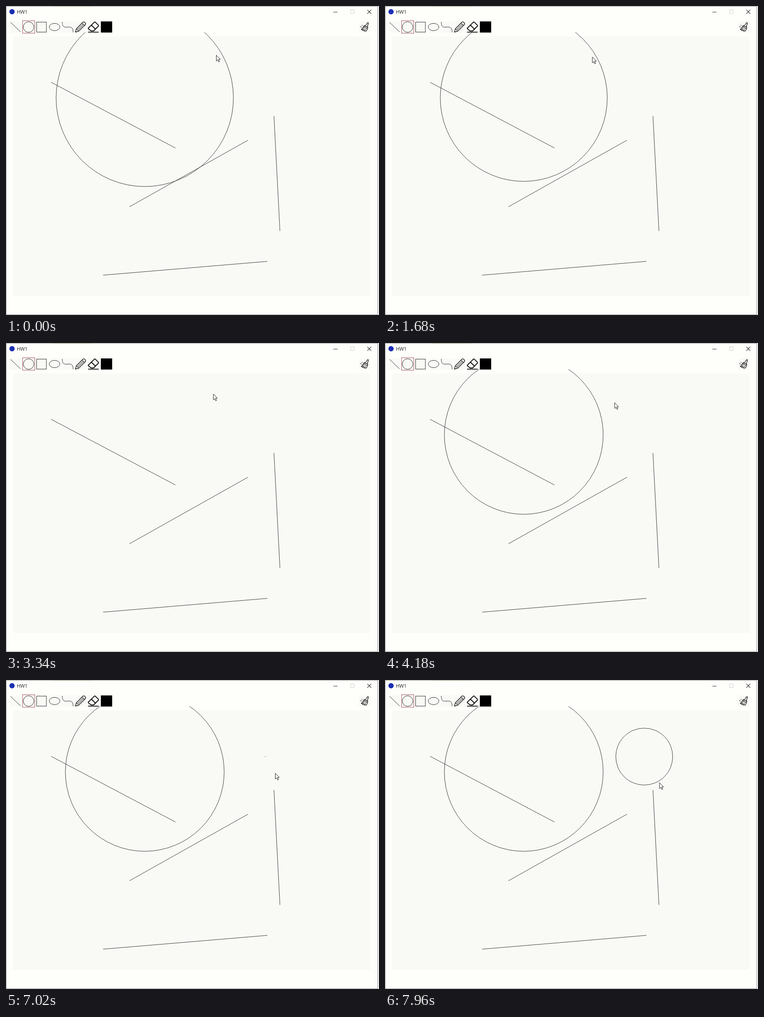
Recreate the animation shown at these times as an HTML page. Size 822 by 681 pixels, loop 8000 ms.

```html
<!DOCTYPE html>
<html lang="en">
<head>
<meta charset="utf-8">
<title>Drawing window</title>
<style>
  html, body { margin: 0; width: 100%; height: 100%; overflow: hidden; background: #fefefb; }
  svg { display: block; width: 100%; height: 100%; }
  .title { font: 10.5px "Open Sans", "Noto Sans", sans-serif; fill: #222; }
  .ink { fill: none; stroke: #3c3c3c; stroke-width: 1; }
  .icon { fill: none; stroke: #333; stroke-width: 1; }
  .bold { fill: none; stroke: #111; stroke-linejoin: round; stroke-linecap: round; }
  .sheet { fill: #f9faf6; }
</style>
</head>
<body>
<svg viewBox="0 0 822 681" preserveAspectRatio="none">
  <defs>
    <clipPath id="area"><rect x="16" y="58" width="787" height="581"/></clipPath>
  </defs>

  <!-- window frame -->
  <rect width="822" height="681" fill="#fefefb"/>
  <path d="M0.5 681V0.5H820" fill="none" stroke="#8c8c8a"/>
  <path d="M104 .5H190" stroke="#817b62"/>
  <path d="M819.5 0V680.5H0" fill="none" stroke="#858585"/>
  <circle cx="13.3" cy="12.6" r="5.8" fill="#1c2fb4"/>
  <text class="title" x="24" y="16.6">HW1</text>
  <path d="M721.5 13.5H730.5" stroke="#333"/>
  <rect x="759.5" y="8.5" width="7.5" height="8" fill="none" stroke="#d0d0cd"/>
  <path d="M796.3 8.3L805 17M805 8.3L796.3 17" stroke="#333" stroke-width="1.1"/>

  <rect class="sheet" x="16" y="67" width="787" height="572"/>

  <!-- toolbar -->
  <g class="sheet">
    <rect x="9" y="34" width="25" height="25"/>
    <rect x="38" y="34" width="24" height="25"/>
    <rect x="66" y="34" width="25" height="25"/>
    <rect x="95" y="34" width="25" height="25"/>
    <rect x="123" y="34" width="26" height="25"/>
    <rect x="152" y="34" width="25" height="25"/>
    <rect x="180" y="34" width="26" height="25"/>
    <rect x="778" y="34" width="25" height="25"/>
  </g>
  <rect x="36.5" y="32.5" width="27" height="27.5" fill="none" stroke="#a3545c"/>
  <g class="icon">
    <path d="M10 36L32 57"/>
    <circle cx="49.8" cy="46.4" r="11.6"/>
    <rect x="67.5" y="35.5" width="21.5" height="22"/>
    <ellipse cx="107" cy="46.3" rx="11.8" ry="8"/>
    <path d="M124 35C124 44 126 47.5 135 46.5C145 45.5 147.5 48 148 58"/>
  </g>
  <g class="bold" stroke-width="1.3">
    <path d="M153 57.5L155 50.3L169.3 35.7Q171.3 34 173.3 35.8L174.7 37.2Q176.5 39.2 174.8 41.2L160.3 55.6Z"/>
    <path d="M155 50.3L160.3 55.6M157 52.3L170.5 38.8M158.6 53.9L172.2 40.3M167.3 37.8L172.8 43.3" stroke-width="1"/>
  </g>
  <g class="bold" stroke-width="1.9">
    <path d="M181.7 48.5L194.5 35.8Q195.7 34.8 197 35.8L203.4 42.2Q204.6 43.5 203.4 44.8L193 55H187.5L181.7 50.2Q180.8 49.3 181.7 48.5Z"/>
    <path d="M188.2 42.2L197 50.8M181.5 57.6H203.5"/>
  </g>
  <rect x="209" y="34" width="25" height="24.5" fill="#000"/>
  <g class="bold" stroke-width="1.3">
    <path d="M792 43.5L796.5 37Q798 36 798.7 37.8L796.2 45.8"/>
    <path d="M789.2 43.2L797.5 47.2L796.2 50L788 46Z"/>
    <path d="M788 46Q786.8 50.2 783 51.2Q787 55 793.8 55.3Q796 53 796.2 50M786.3 53L789.2 50.2M790.2 54.7L792.2 51.5"/>
  </g>
  <g fill="#222">
    <circle cx="782" cy="45.8" r="1"/>
    <circle cx="784.6" cy="42.6" r=".9"/>
    <circle cx="785" cy="47.3" r=".8"/>
  </g>

  <!-- drawing -->
  <g class="ink" clip-path="url(#area)">
    <path d="M99.5 168.2L373.5 313M272 442.5L533.2 295.8M590.5 242.5L603.7 495.7M214 593.2L576 562.8"/>
    <circle id="big" cx="305.8" cy="202.5"/>
    <circle id="small" cx="571.3" cy="168.8"/>
  </g>
  <path id="pointer" d="M.5 .5V13.3L3.5 10.5L5.6 15.3L7.6 14.4L5.5 9.7H9.4Z" fill="#fff" stroke="#222" stroke-width="1"/>
</svg>
<script>
  const LOOP = 8000;

  // [time, radius], held until the next entry
  const bigSteps = [[0, 195.4], [20, 184], [1820, 180.3], [1960, 175], [3340, 0], [3360, 175]];
  const smallSteps = [[0, 0], [6860, 0.4], [7120, 20], [7260, 36], [7400, 41], [7520, 46.3], [7680, 54], [7840, 62.7]];

  // [time, x, y], joined by straight moves
  const path = [
    [0, 463, 108], [1400, 463, 108], [1540, 457, 111], [1680, 456.5, 112],
    [3760, 456.5, 112], [3860, 454, 111.5], [4180, 505.5, 131], [4500, 540, 141],
    [4580, 540, 141], [4760, 571, 157], [4880, 571, 157], [4920, 571, 161],
    [5160, 571, 161], [5200, 571, 168], [6580, 571, 168], [6860, 591, 199],
    [7000, 591, 199], [7020, 593, 205], [7120, 593, 205], [7540, 604.5, 226], [LOOP, 604.5, 226]
  ];

  const byId = id => document.getElementById(id);
  const big = byId("big"), small = byId("small"), pointer = byId("pointer");

  const held = (steps, t) => steps.filter(s => s[0] <= t).pop()[1];

  function along(points, t) {
    const i = points.findIndex(p => p[0] > t);
    const [t0, x0, y0] = points[i - 1], [t1, x1, y1] = points[i];
    const k = (t - t0) / (t1 - t0);
    return [x0 + (x1 - x0) * k, y0 + (y1 - y0) * k];
  }

  function setRadius(circle, r) {
    circle.setAttribute("r", r);
    circle.style.display = r ? "" : "none";
  }

  function draw(now) {
    const t = Math.max(0, now - start) % LOOP;
    setRadius(big, held(bigSteps, t));
    setRadius(small, held(smallSteps, t));
    pointer.setAttribute("transform", `translate(${along(path, t)})`);
    requestAnimationFrame(draw);
  }

  const start = performance.now();
  draw(start);
</script>
</body>
</html>
```
